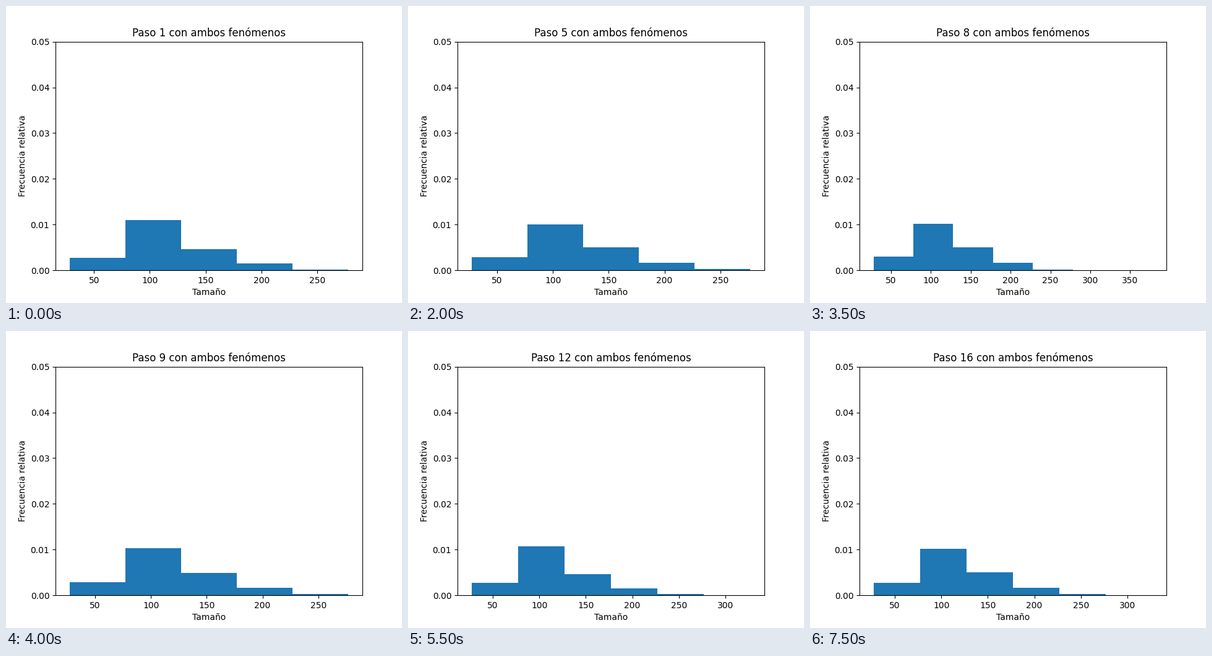
These frames come from a looping animation (640x480 px, 8000 ms). A matplotlib script:

```python
import numpy as np
import matplotlib.pyplot as plt
from matplotlib.animation import FuncAnimation

BIN = 50
BINS = [5, 5, 6, 6, 5, 7, 6, 7, 5, 5, 5, 6, 6, 6, 5, 6]  # bins up to the largest size

# Key points the population drifts between: smallest size and
# the densities (in 1e-5) of the first two bins
KEY_STEPS = [1, 3, 6, 8, 11, 14, 16]
SMALLEST = [28, 28, 26, 28, 26, 29, 27]
FIRST = [273, 330, 273, 300, 273, 287, 276]
PEAK = [1098, 1009, 1004, 1017, 1058, 1085, 1021]

TOTAL = 1e5 / BIN  # densities of all bins add up to this


def state(step):
    """First edge and bar densities at a step."""
    start, first, peak = (np.interp(step, KEY_STEPS, key)
                          for key in (SMALLEST, FIRST, PEAK))
    start = round(start)
    tail = 30 if start < 28 else 14  # lower edges leave more in the last bar
    rest = TOTAL - first - peak - tail
    return start, np.array([first, peak, 0.75 * rest, 0.25 * rest, tail]) * 1e-5


fig, ax = plt.subplots(figsize=(6.4, 4.8), dpi=100)


def draw(i):
    start, density = state(i + 1)
    span = BINS[i] * BIN
    ax.clear()
    ax.bar(start + BIN * np.arange(len(density)), density, width=BIN, align="edge")
    ax.set_xlim(start - 0.05 * span, start + 1.05 * span)
    ax.set_ylim(0, 0.05)
    ax.set_title(f"Paso {i + 1} con ambos fenómenos")
    ax.set_xlabel("Tamaño")
    ax.set_ylabel("Frecuencia relativa")
    return []


anim = FuncAnimation(fig, draw, frames=len(BINS), init_func=lambda: draw(0),
                     interval=500, repeat=True, repeat_delay=0)
plt.show()
```
